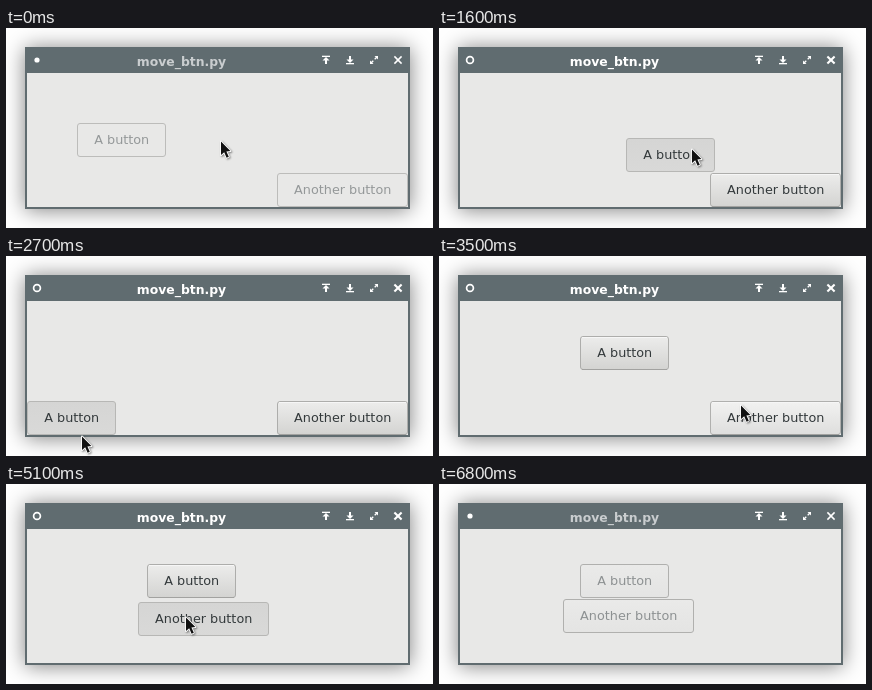
Animation of 427 by 200 pixels, one loop 6.9 s. Source, as an HTML page with a canvas:

```html
<!DOCTYPE html>
<html lang="en">
<head>
<meta charset="utf-8">
<title>Dragging buttons</title>
<style>
html, body { margin: 0; width: 100%; height: 100%; overflow: hidden; background: #fff; }
canvas { display: block; width: 427px; height: 200px; }
</style>
</head>
<body>
<canvas id="stage" width="427" height="200"></canvas>
<script>
const ctx = document.getElementById('stage').getContext('2d');
const LOOP = 6900, STEP = 100;
const AREA = { left: 21, top: 45, right: 402, bottom: 179 };
const BUTTON_H = 34;
const FOCUS_IN = 4, FOCUS_OUT = 68;

// Turning points of the pointer: step, x, y
const TURNS = [
  [0, 214, 112], [4, 136, 105], [5, 136, 105], [9, 186, 74], [16, 252, 120],
  [18, 292, 92], [21, 147, 50], [25, 62, 165], [27, 75, 179], [28, 157, 142],
  [31, 206, 90], [32, 206, 90], [36, 319, 159], [39.5, 204, 130], [43, 322, 164],
  [44, 286, 176], [45, 249, 161], [51, 179, 132], [59, 175, 129], [62, 172, 129],
  [67, 190, -30]
];

// Dragged buttons follow the pointer, held at a grab point, within the area
const BUTTONS = [
  { label: 'A button', w: 89, grabX: 65, grabY: 10, press: 4, release: 32, lag: 0 },
  { label: 'Another button', w: 131, grabX: 48, grabY: 14, press: 36, release: 62, lag: 0.33 }
];

const clamp = (v, lo, hi) => Math.min(hi, Math.max(lo, v));
const slope = (i, k) => (TURNS[i + 1][k] - TURNS[i][k]) / (TURNS[i + 1][0] - TURNS[i][0]);

// Monotone tangent, so the path never overshoots a turning point
function tangent(i, k) {
  if (i === 0) return slope(0, k);
  if (i === TURNS.length - 1) return slope(i - 1, k);
  const a = slope(i - 1, k), b = slope(i, k);
  return a * b <= 0 ? 0 : 2 * a * b / (a + b);
}

function pointer(s) {
  const last = TURNS.length - 1;
  s = clamp(s, 0, TURNS[last][0]);
  let i = 0;
  while (i < last - 1 && TURNS[i + 1][0] < s) i++;
  const h = TURNS[i + 1][0] - TURNS[i][0];
  const u = (s - TURNS[i][0]) / h, v = 1 - u;
  const [x, y] = [1, 2].map(k =>
    v * v * (1 + 2 * u) * TURNS[i][k] + u * u * (3 - 2 * u) * TURNS[i + 1][k] +
    h * u * v * (v * tangent(i, k) - u * tangent(i + 1, k)));
  return { x: Math.round(x), y: Math.round(y) };
}

function place(b, s) {
  const p = pointer(clamp(s - b.lag, b.press, b.release));
  return {
    x: clamp(p.x - b.grabX, AREA.left, AREA.right - b.w),
    y: clamp(p.y - b.grabY, AREA.top, AREA.bottom - BUTTON_H)
  };
}

function rect(x, y, w, h, color) {
  ctx.fillStyle = color;
  ctx.fillRect(x, y, w, h);
}

function trace(points) {
  ctx.beginPath();
  points.forEach(([x, y]) => ctx.lineTo(x, y));
  ctx.closePath();
}

function poly(points, color) {
  trace(points);
  ctx.fillStyle = color;
  ctx.fill();
}

function line(x1, y1, x2, y2, width) {
  ctx.lineWidth = width;
  ctx.beginPath();
  ctx.moveTo(x1, y1);
  ctx.lineTo(x2, y2);
  ctx.stroke();
}

function text(str, x, y, font, color) {
  ctx.font = font + ' "DejaVu Sans", sans-serif';
  ctx.fillStyle = color;
  ctx.textAlign = 'center';
  ctx.fillText(str, x, y);
}

// Vertical arrow with a bar at its tip; dir is -1 for up, 1 for down
function barArrow(x, dir) {
  ctx.save();
  ctx.translate(x, 32);
  ctx.scale(1, dir);
  rect(-4, 3, 8, 1.3, '#fff');
  poly([[0, 3], [3.5, -0.5], [-3.5, -0.5]], '#fff');
  rect(-1, -4, 2, 4, '#fff');
  ctx.restore();
}

function drawIcons(active) {
  ctx.strokeStyle = ctx.fillStyle = '#fff';
  ctx.beginPath();
  ctx.arc(31, 32, active ? 3.4 : 2.6, 0, 7);
  ctx.lineWidth = 1.7;
  if (active) ctx.stroke(); else ctx.fill();

  barArrow(320, -1);
  barArrow(344, 1);

  poly([[368.5, 28], [372, 28], [372, 31.5]], '#fff');
  poly([[364, 32.5], [364, 36], [367.5, 36]], '#fff');
  line(365, 35, 367.3, 32.7, 1.3);
  line(368.7, 31.3, 371, 29, 1.3);

  const cross = active ? 2.1 : 1.5;
  line(388.4, 28.4, 395.6, 35.6, cross);
  line(395.6, 28.4, 388.4, 35.6, cross);
}

function drawWindow(active) {
  rect(0, 0, 427, 200, '#fff');
  ctx.save();
  ctx.shadowColor = 'rgba(0,0,0,0.5)';
  ctx.shadowBlur = 20;
  ctx.shadowOffsetY = 1;
  rect(19, 19, 385, 162, '#606c70');
  ctx.restore();
  rect(AREA.left, AREA.top, AREA.right - AREA.left, AREA.bottom - AREA.top, '#e8e8e7');
  text('move_btn.py', 175.5, 38, 'bold 12.4px', active ? '#fff' : '#c9cdcf');
  drawIcons(active);
}

// Fill top, fill bottom, edge, label
const STYLES = {
  normal: ['#ededec', '#d3d3d1', '#adadab', '#33393b'],
  hover: ['#f2f2f1', '#dededd', '#b0b0ae', '#33393b'],
  pressed: ['#d5d5d4', '#d9d9d8', '#b7b7b5', '#33393b'],
  fading: ['#eaeae9', '#e4e4e3', '#b0b0ae', '#8d9192'],
  backdrop: ['#e8e8e7', '#e8e8e7', '#bcbcba', '#949899']
};

function drawButton(b, { x, y }, state) {
  const [top, bottom, edge, ink] = STYLES[state];
  const fill = ctx.createLinearGradient(0, y, 0, y + BUTTON_H);
  fill.addColorStop(0, top);
  fill.addColorStop(1, bottom);
  ctx.beginPath();
  ctx.roundRect(x + 0.5, y + 0.5, b.w - 1, BUTTON_H - 1, 2.5);
  ctx.fillStyle = fill;
  ctx.fill();
  ctx.strokeStyle = edge;
  ctx.lineWidth = 1;
  ctx.stroke();
  if (state === 'normal' || state === 'hover') {
    rect(x + 2, y + 1, b.w - 4, 1, '#f6f6f6');
    rect(x + 2, y + BUTTON_H - 1, b.w - 4, 1, '#a2a2a0');
  }
  text(b.label, x + b.w / 2 + 0.2, y + 21, '12.8px', ink);
}

function drawPointer({ x, y }) {
  ctx.save();
  ctx.translate(x + 1, y + 1.5);
  trace([[0, 0], [0, 13.6], [3.2, 10.8], [5.6, 16.2], [7.8, 15.2], [5.4, 10], [9.4, 9.6]]);
  ctx.lineJoin = 'round';
  ctx.lineWidth = 1.8;
  ctx.strokeStyle = '#fff';
  ctx.shadowColor = 'rgba(0,0,0,0.45)';
  ctx.shadowBlur = 2;
  ctx.shadowOffsetX = ctx.shadowOffsetY = 1;
  ctx.stroke();
  ctx.shadowColor = 'transparent';
  ctx.fillStyle = '#111';
  ctx.fill();
  ctx.restore();
}

function stateOf(b, pos, p, s) {
  if (s >= FOCUS_OUT) return 'fading';
  if (s < FOCUS_IN) return 'backdrop';
  if (s >= b.press && s < b.release) return 'pressed';
  const inside = p.x >= pos.x && p.x < pos.x + b.w && p.y >= pos.y && p.y < pos.y + BUTTON_H;
  return inside ? 'hover' : 'normal';
}

function draw(now) {
  const s = Math.floor((now % LOOP) / STEP);
  const p = pointer(s);
  drawWindow(s >= FOCUS_IN && s < FOCUS_OUT);
  for (const b of BUTTONS) {
    const pos = place(b, s);
    drawButton(b, pos, stateOf(b, pos, p, s));
  }
  drawPointer(p);
}

const start = performance.now();
function tick() {
  draw(performance.now() - start);
  requestAnimationFrame(tick);
}
tick();
</script>
</body>
</html>
```
